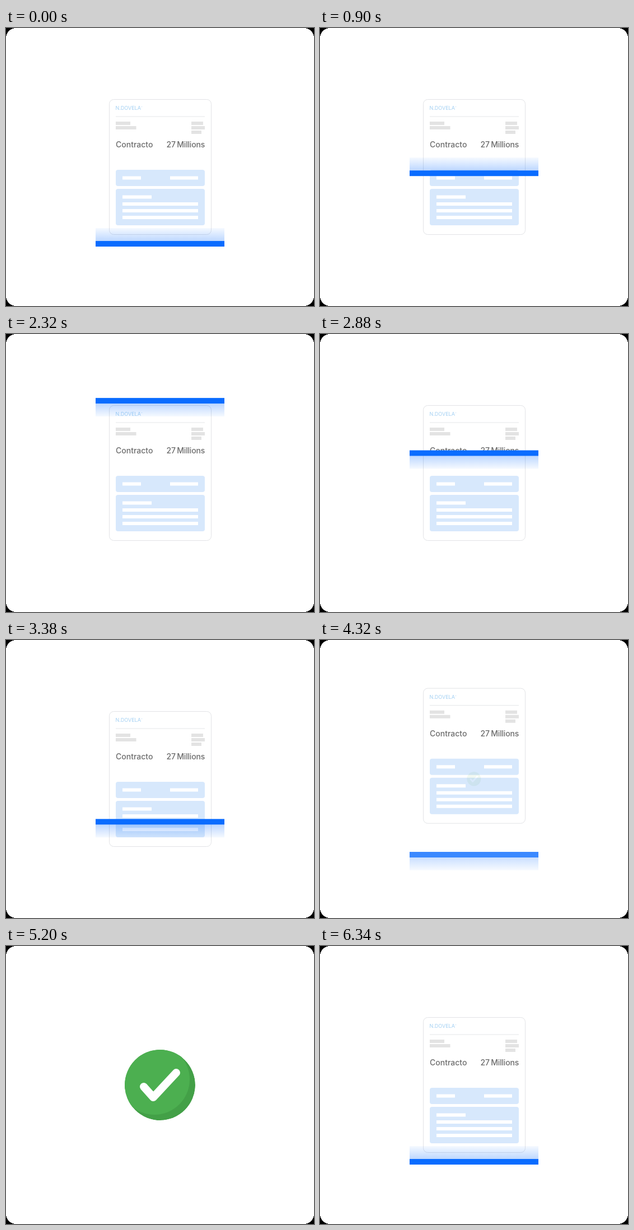
An HTML page for the animation above (6440 ms loop, 550 by 496 pixels).

```html
<!DOCTYPE html>
<html lang="es">
<head>
<meta charset="utf-8">
<title>Document scan</title>
<style>
  html, body { margin: 0; width: 100%; height: 100%; overflow: hidden; background: #000; }
  svg { display: block; width: 550px; height: 496px; }
  text { font-family: Inter, Roboto, sans-serif; }
  .label { font-size: 14px; font-weight: 500; fill: #6c6c6c; }
  .amount { letter-spacing: -.2px; word-spacing: -1px; }
  .brand { font-size: 9px; fill: #a3d0f3; }
</style>
</head>
<body>
<svg viewBox="0 0 550 496">
  <defs>
    <linearGradient id="glow" x1="0" y1="0" x2="0" y2="1">
      <stop offset="0" stop-color="#0a6cff" stop-opacity=".04"/>
      <stop offset="1" stop-color="#0a6cff" stop-opacity=".27"/>
    </linearGradient>
    <clipPath id="disc"><circle r="63"/></clipPath>
  </defs>
  <rect width="550" height="496" rx="18" fill="#fff" shape-rendering="crispEdges"/>

  <g id="doc">
    <rect x="184.5" y="127.5" width="182" height="241" rx="8" fill="#fff" stroke="#e2e3e6"/>
    <text class="brand" x="195.5" y="146">N.DOVELA<tspan font-size="4" dy="-3">™</tspan></text>
    <path d="M196 158H355" stroke="#e4e6e8"/>
    <path fill="#e3e3e3" d="M196 167h26v6h-26z M196 175h36.5v6h-36.5z
      M331 167h21v6h-21z M331 175h24v6h-24z M331 183h18v6h-18z"/>
    <text class="label" x="196" y="213">Contracto</text>
    <text class="label amount" x="355" y="213" text-anchor="end">27 Millions</text>
    <g fill="#d7e8fc">
      <rect x="196" y="253" width="159" height="29" rx="4"/>
      <rect x="196" y="287" width="159" height="65" rx="4"/>
    </g>
    <path fill="#fff" d="M208 264.5h33v6h-33z M293 264.5h50v6h-50z M208 298.5h52v6h-52z
      M208 311h135v6h-135z M208 323h135v6h-135z M208 335h135v6h-135z"/>
  </g>

  <g id="scanner">
    <rect id="trail" x="160" y="-23" width="230" height="23" fill="url(#glow)"/>
    <rect x="160" width="230" height="10" fill="#0a6cff"/>
  </g>

  <g id="badge">
    <g clip-path="url(#disc)">
      <circle r="63" fill="#43a047"/>
      <circle cx="-10" cy="-10" r="63" fill="#4caf50"/>
    </g>
    <path d="M-29 3L-12 22L29 -22" fill="none" stroke="#fff" stroke-width="14"
      stroke-linecap="round" stroke-linejoin="round"/>
  </g>
</svg>
<script>
const LOOP = 6440, STEP = 20, TURN = 2012, TOP = 101;
const [doc, scanner, trail, badge] =
  ['doc', 'scanner', 'trail', 'badge'].map(id => document.getElementById(id));

// Cubic Bezier easing with control points (x1, 0) and (x2, 1).
function bezier(x1, x2) {
  return x => {
    if (x <= 0) return 0;
    if (x >= 1) return 1;
    let lo = 0, hi = 1, s = .5;
    for (let i = 0; i < 24; i++) {
      s = (lo + hi) / 2;
      const r = 1 - s;
      if (3 * x1 * s * r * r + 3 * x2 * s * s * r + s ** 3 < x) lo = s; else hi = s;
    }
    return s * s * (3 - 2 * s);
  };
}
const easeInOut = bezier(.42, .58), easeOut = bezier(0, .58);
const tween = (t, start, end, ease, from, to) =>
  from + (to - from) * ease((t - start) / (end - start));

function barTop(t) {
  if (t < 20 || t >= 6000) return 380;
  return t < TURN
    ? tween(t, -10, 1920, easeInOut, 380, TOP)
    : tween(t, TURN, 4020, easeInOut, TOP, 378);
}

function draw(t) {
  const done = t < 6000
    ? tween(t, 4255, 5200, easeOut, 0, 1)
    : tween(t, 6160, 6340, easeOut, 1, 0);
  const below = t >= TURN && t < 6000;
  doc.setAttribute('transform', `translate(0 ${-369 * done})`);
  scanner.setAttribute('transform', `translate(0 ${barTop(t)})`);
  scanner.setAttribute('opacity', (1 - done) ** 1.9);
  trail.setAttribute('transform', below ? 'translate(0 10) scale(1 -1)' : '');
  badge.setAttribute('transform', `translate(275 248) scale(${.1 + .9 * done})`);
  badge.setAttribute('opacity', done ** 1.25);
  doc.setAttribute('visibility', done < 1 ? 'visible' : 'hidden');
}

const origin = performance.now();
function tick() {
  const t = (performance.now() - origin) % LOOP;
  draw(Math.floor(t / STEP) * STEP);
  requestAnimationFrame(tick);
}
draw(0);
requestAnimationFrame(tick);
</script>
</body>
</html>
```
